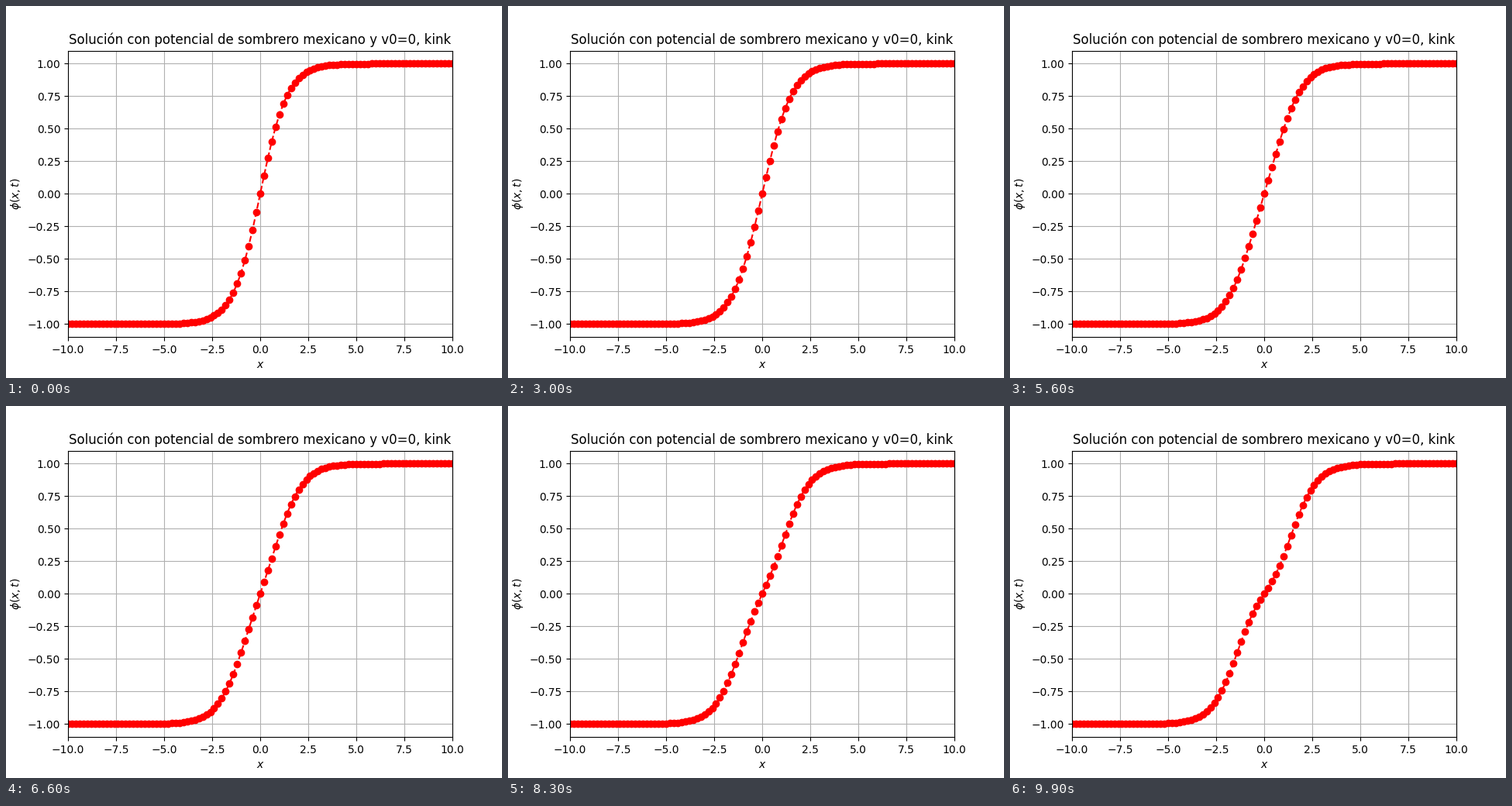
Animation of 640 by 480 pixels, one loop 10000 ms. Source, as a matplotlib script:

```python
import numpy as np
import matplotlib.pyplot as plt
from matplotlib.animation import FuncAnimation

FRAMES = 100
DT = 0.01
x = np.linspace(-10, 10, 101)
DX = x[1] - x[0]


def accel(phi):
    """Field acceleration with both ends held fixed."""
    a = np.zeros_like(phi)
    mid = phi[1:-1]
    a[1:-1] = (phi[2:] - 2 * mid + phi[:-2]) / DX**2 + mid**3 - mid
    return a


def evolve(phi0):
    """Leapfrog solution starting at rest, one row per time step."""
    rows = [phi0, phi0 + 0.5 * DT**2 * accel(phi0)]
    while len(rows) < FRAMES:
        rows.append(2 * rows[-1] - rows[-2] + DT**2 * accel(rows[-1]))
    return np.array(rows)


phi = evolve(np.tanh(x / np.sqrt(2)))

fig, ax = plt.subplots(figsize=(6.4, 4.8), dpi=100)
line, = ax.plot(x, phi[0], "ro--")
ax.set_xlim(-10, 10)
ax.set_ylim(-1.1, 1.1)
ax.set_title("Solución con potencial de sombrero mexicano y v0=0, kink")
ax.set_xlabel("$x$")
ax.set_ylabel(r"$\phi(x,t)$")
ax.grid(True)


def update(i):
    line.set_ydata(phi[i])
    return line,


anim = FuncAnimation(fig, update, frames=FRAMES, interval=100,
                     repeat=True, repeat_delay=0)
plt.show()
```
